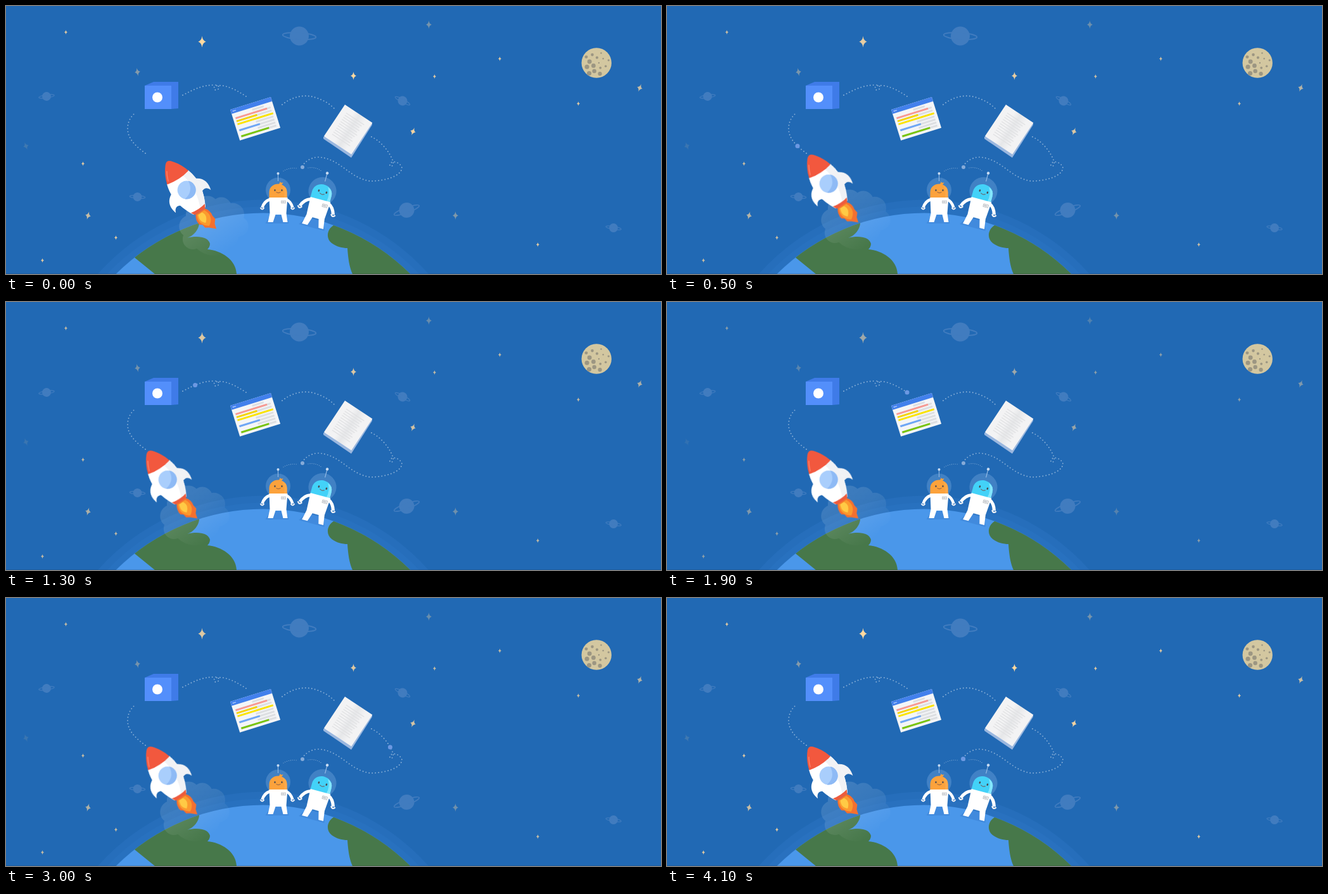
An HTML page for the animation above (4.6 s loop, 1034 by 424 pixels).

```html
<!DOCTYPE html>
<html lang="en">
<head>
<meta charset="utf-8">
<style>
  html, body { margin: 0; width: 100%; height: 100%; overflow: hidden; background: #2169b4; }
  svg { display: block; width: 1034px; height: 424px; }
  .trail { fill: none; stroke: #fff; stroke-opacity: .5; stroke-width: 1.8; stroke-linecap: round; stroke-dasharray: 0 5; }
  .signal { stroke-width: 1.1; stroke-dasharray: 0 3; }
</style>
</head>
<body>
<svg viewBox="0 0 1034 424">
  <defs>
    <linearGradient id="smokeFade" gradientUnits="userSpaceOnUse" x1="275" y1="290" x2="340" y2="385">
      <stop stop-color="#fff" stop-opacity=".14"/>
      <stop offset=".4" stop-color="#fff" stop-opacity=".1"/>
      <stop offset=".85" stop-color="#fff" stop-opacity="0"/>
    </linearGradient>
    <linearGradient id="fold">
      <stop offset=".35" stop-color="#f3f3f4"/>
      <stop offset=".55" stop-color="#e6e7e9"/>
      <stop offset=".8" stop-color="#f3f3f4"/>
    </linearGradient>
    <clipPath id="globe"><circle cx="406" cy="655.5" r="328"/></clipPath>
  </defs>

  <g id="planets" fill="#417cbf" stroke="#417cbf"></g>
  <g id="stars" fill="#ffd9a0"></g>
  <g transform="translate(932.2 90)">
    <circle r="23.7" fill="#d3c7a0"/>
    <g id="craters" fill="#9c9682"></g>
  </g>

  <!-- planet surface -->
  <g fill="#4a97ea">
    <circle cx="406" cy="655.5" r="349" opacity=".12"/>
    <circle cx="406" cy="655.5" r="338" opacity=".08"/>
    <circle cx="406" cy="655.5" r="328"/>
  </g>
  <g fill="#47784a" clip-path="url(#globe)">
    <path d="M203 398L195 330H305V344C304 354 297 363 286 367C302 363 319 365 322 376C322 380 320 383 318 385C340 387 363 401 364 424H235Z"/>
    <path d="M517 347C506 354 505 368 514 375C522 381 531 383 539 383C540 399 542 413 547 424H650V340Z"/>
  </g>

  <g id="trails" class="trail"></g>
  <path class="trail signal" d="M438 261Q448 255 460 257M477 256Q490 254 499 262"/>
  <circle cx="468" cy="255" r="3" fill="#86abd8"/>
  <circle id="dot" r="3.5" fill="#6c98e2"/>

  <!-- box -->
  <path d="M219 126L233 120H272V162L261 163H219Z" fill="#3f7be8"/>
  <path d="M219 126H261V163H219Z" fill="#538ffb"/>
  <circle cx="239" cy="144.5" r="8" fill="#fff"/>

  <!-- browser window -->
  <g transform="translate(354 164) rotate(-17.3)">
    <path d="M0 0H67V51H0Z" fill="#f4f5f7"/>
    <path d="M0 0H67V7H0Z" fill="#4280ec"/>
    <path d="M3 3.5h5" stroke="#cfe0ff" stroke-width="1.5" stroke-dasharray="1.5 .5"/>
    <g id="rows" stroke-width="3"></g>
  </g>

  <!-- document -->
  <path d="M501 207V210L545 240L578 188V185Z" fill="#9ab7df"/>
  <g transform="translate(535 156) rotate(33.5)">
    <path d="M0 0H52V60H0Z" fill="url(#fold)"/>
    <g id="lines" stroke="#dfe0e2" stroke-width="1.2"></g>
  </g>

  <g id="rocket">
    <path id="smoke" fill="url(#smokeFade)"/>
    <g transform="translate(226 238) rotate(-33)">
      <path d="M-8 92Q-14 100 -12 109L-8 112L-7 118L-2 121L7 129L9 121L14 115L13 108Q15 99 9 92Z" fill="#f4702f"/>
      <path d="M-7 94C-13 106 -7 114 0 119C9 114 13 105 7 94Z" fill="#fb9a2e"/>
      <path d="M-5 95C-9 104 -6 108 -2 112C4 107 6 101 2 95Z" fill="#ffca45"/>
      <path d="M20 43C34 49 37 60 33 73C30 65 25 64 19 68Z" fill="#f1f2f5"/>
      <path d="M-20 43C-34 49 -37 60 -33 73C-30 65 -25 64 -19 68Z" fill="#fff"/>
      <path d="M-20 27C-27 48 -23 70 -11 91H11C23 70 27 48 20 27Z" fill="#fff"/>
      <path d="M8 27H20C27 48 23 70 11 91H2C12 70 14 48 8 27Z" fill="#f1f2f5"/>
      <path d="M-20 28C-17 17 -12 8 -5 0Q0 -5 5 0C12 8 17 17 20 28Q0 33 -20 28Z" fill="#f2583e"/>
      <path d="M-16 25Q-13 16 -9 10" fill="none" stroke="#ff8067" stroke-width="1.5"/>
      <path d="M-13 86Q0 89 13 86L10 92H-10Z" fill="#ee5b3c"/>
      <circle cx="1" cy="52" r="14.500" fill="#a9cefc"/>
      <path d="M11 41.500A14.500 14.500 0 0 1 -9 62.500Q9 60 11 41.500Z" fill="#8ebaf5"/>
    </g>
  </g>

  <g id="aliens"></g>
  <path d="M0 423H1034V424H0Z" opacity=".12"/>
</svg>
<script>
const LOOP = 4600, STEP = 100;
const $ = id => document.getElementById(id);
const fill = (id, items, draw) => { $(id).innerHTML = items.map(draw).join(''); };
const range = n => [...Array(n).keys()];

// x, y, radius, ring tilt
fill('planets', [
  [463, 47.5, 15, 4], [64, 143, 7, -8], [207.5, 302, 7, 4],
  [626, 150, 7.5, 28], [632.5, 323, 12, -20], [959, 351, 7, 10]
], ([x, y, r, tilt]) => `<g transform="translate(${x} ${y}) rotate(${tilt})">
  <circle r="${r}" stroke="none"/>
  <ellipse rx="${r * 1.75}" ry="${r * .35}" fill="none" stroke-width="${r / 9 + .4}"/></g>`);

const star = (x, y, opacity, tilt = 0, size = 6.5) => `<path opacity="${opacity}"
  transform="translate(${x + .5} ${y + .5}) rotate(${tilt}) scale(${size * .68} ${size})"
  d="M0 -1Q.12 -.2 1 0Q.12 .2 0 1Q-.12 .2 -1 0Q-.12 -.2 0 -1Z"/>`;
const tiny = [[94, 41], [121, 249], [173, 366], [57, 402], [676, 111], [779, 83], [903, 154], [839, 377]];
const large = [
  [309, 56, 1, 0, 9], [548, 110, 1], [207, 104, .45, -10], [31, 221, .14, -20], [129, 331, .75, 15],
  [667, 29, .38], [642, 198, .95, 20], [1000, 129, .75, 20], [709, 331, .42]
];
fill('stars', [...tiny.map(p => [...p, .85, 0, 3.5]), ...large], s => star(...s));

// craters spiral outwards
fill('craters', range(15), i => {
  const angle = i * 2.4, far = 5.3 * Math.sqrt(i + .5), r = 1.2 + 2.4 * Math.sin(i * 1.9) ** 2;
  return `<circle cx="${far * Math.cos(angle)}" cy="${far * Math.sin(angle)}" r="${r}"/>`;
});

const bar = (from, to, row, color) => `<path d="M${from} ${10.5 + row * 5}H${to}" stroke="${color}"/>`;
const marks = [['#f79a94', 56], ['#f4d40c', 38], ['#fbe400', 63], null, ['#6ea6f5', 38], null, ['#79c410', 50]];
fill('rows', [null, ...marks], (mark, row) =>
  bar(33, row ? 62 : 52, row, '#dddfe2') + (mark ? bar(4, mark[1], row, mark[0]) : ''));

fill('lines', range(11), i => `<path d="M9 ${10 + i * 4}H${43 - i * 2 % 5}"/>`);

// puffs around one large cloud
const disc = (x, y, r) => `M${x - r} ${y}a${r} ${r} 0 1 0 ${2 * r} 0a${r} ${r} 0 1 0 ${-2 * r} 0`;
$('smoke').setAttribute('d', disc(299, 345, 40) + range(7).map(i => {
  const a = 3.6 - i * .58;
  return disc(299 + 38 * Math.cos(a), 343 - 36 * Math.sin(a), 16 + i % 2 * 2);
}).join(''));

const alien = ([x, y, tilt, size, color, shade, hair]) => `
  <g transform="translate(${x} ${y}) rotate(${tilt}) scale(${size})">
    <path d="M-20 41L-12 28H13L17 41Z" fill="#3f87da" opacity=".8"/>
    <path d="M0 -36V-26" stroke="#9dbfe4"/>
    <circle cy="-38" r="2" fill="#c9dcf2"/>
    <circle cy="-12" r="19.5" fill="#8db8ea" opacity=".3"/>
    <path d="M-14 1V-8C-14 -26 14 -26 14 -8V1Z" fill="${color}"/>
    <path d="M6 -19.5Q14 -17 14 -8V1H9Q12 -10 6 -19.5Z" fill="${shade}"/>
    ${hair ? `<path d="M-4 -20Q3 -20 3 -25Q5 -22 8 -24Q6 -19 2 -19Z" fill="${color}"/>` : ''}
    <path d="M-5 -12v1M6 -12v1" stroke="#4a4a52" stroke-width="2.2" stroke-linecap="round"/>
    <path d="M-3 -8.5Q.5 -6 4 -8.5" fill="none" stroke="#75504a" stroke-width=".8"/>
    <path d="M-13 3Q-22 6 -25 16M13 3Q20 6 23 16" fill="none" stroke="#fff" stroke-width="4.5"/>
    <path d="M-28 16Q-25 21 -22 16M20 16Q23 21 26 16" fill="none" stroke="#f0f2f6" stroke-width="2"/>
    <path d="M-14 0H15L13 25L15 39H8L5 27H-4L-8 39H-16L-13 25Z" fill="#fff"/>
    <path d="M5 5H12V9H5Z" fill="#eceef0" stroke="#b9bcc0" stroke-width=".7"/>
    <path d="M6 7H10" stroke="#a9adb2" stroke-width=".8"/>
  </g>`;
fill('aliens', [
  [429.5, 303, 0, 1, '#fca23c', '#fca94a', true],
  [496, 306, 15, 1.13, '#43d2f8', '#83e6fd', false]
], alien);

// start and end time with the route covered in between
const trips = [
  [380, 900, 'M220 233C205 222 192 210 192 194C192 182 198 174 204 169'],
  [1180, 1900, 'M279 141C295 133 308 125 330 125C342 126 334 136 329 132C326 126 335 125 342 126C358 129 368 136 379 143'],
  [2200, 2620, 'M436 156C452 143 472 139 489 145C502 149 511 155 518 162'],
  [2800, 4100, 'M577 207C592 214 606 231 611 246C613 254 605 256 606 250C609 244 622 246 625 256C624 270 596 277 575 277C540 272 528 240 491 239C478 241 470 248 467.5 254.5']
];
fill('trails', trips, ([, , d]) => `<path d="${d}"/>`);
const routes = [...$('trails').children];

// stars fade gently over the loop, with one deeper dip
function glow(t) {
  const fade = Math.sqrt(Math.sin(Math.PI * Math.min(t / 4000, 1)));
  const dip = Math.exp(-(((t - 1900) / 200) ** 2));
  return 1 - .17 * (fade || 0) - .26 * dip;
}

function moveDot(t) {
  const i = trips.findIndex(([from, to]) => t >= from && t <= to);
  $('dot').setAttribute('visibility', i < 0 ? 'hidden' : 'visible');
  if (i < 0) return;
  const [from, to] = trips[i], route = routes[i];
  const { x, y } = route.getPointAtLength(route.getTotalLength() * (t - from) / (to - from));
  $('dot').setAttribute('transform', `translate(${x} ${y})`);
}

function draw(now) {
  const t = Math.floor(now % LOOP / STEP) * STEP;
  const left = (1 - Math.min(t / 400, 1)) ** 1.5;
  $('stars').setAttribute('opacity', glow(t));
  $('rocket').setAttribute('transform', `translate(${30 * left} ${10 * left})`);
  moveDot(Math.min(t, trips.at(-1)[1]));
}

const start = performance.now();
function tick() {
  draw(performance.now() - start);
  requestAnimationFrame(tick);
}
tick();
</script>
</body>
</html>
```
